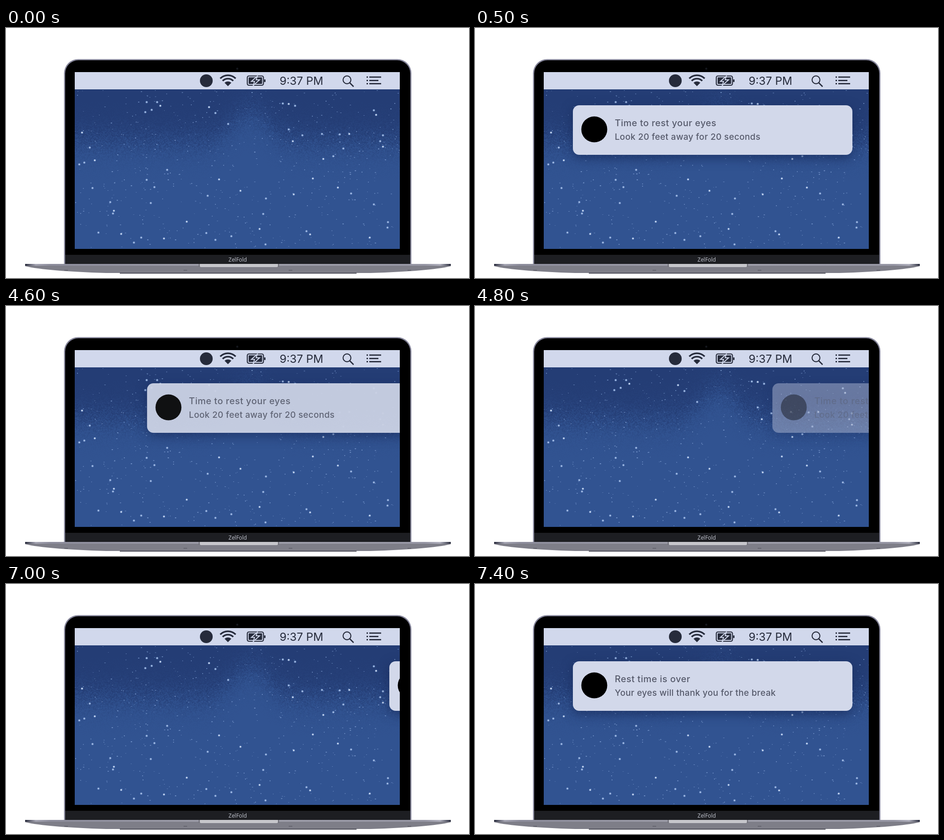
Animation, 1017 px wide and 550 px high, one loop 8 s. Source, as an HTML page with a canvas:

```html
<!DOCTYPE html>
<html lang="en">
<head>
<meta charset="utf-8">
<title>Eye rest reminder</title>
<style>
html, body { margin: 0; width: 100%; height: 100%; overflow: hidden; background: #fff; }
canvas { display: block; }
</style>
</head>
<body>
<canvas id="stage" width="1017" height="550"></canvas>
<script>
const canvas = document.getElementById('stage');
const ctx = canvas.getContext('2d');
const LOOP = 8000, STEP = 100;
const SCREEN = { x: 151, y: 97, w: 714, h: 389 };
const PANEL = { x: 215, y: 170, w: 614, h: 109 };
const TRAVEL = 650;
const PALE = '#d1d8ec', INK = '#262b3b';
const MESSAGES = [
  ['Time to rest your eyes', 'Look 20 feet away for 20 seconds'],
  ['Rest time is over', 'Your eyes will thank you for the break']
];
const STARS = [
  167,230, 161,300, 172,296, 195,291, 354,312, 318,385, 729,351, 309,163,
  332,163, 339,171, 320,180, 306,185, 446,174, 460,187, 488,211, 621,167,
  608,166, 621,223, 630,249, 635,171, 651,236, 697,288, 719,282, 808,181,
  813,191, 828,236, 822,249, 828,261, 694,233, 733,234, 754,233, 741,265,
  184,263, 237,402, 235,408, 229,383, 347,463, 440,451, 460,466, 557,442,
  660,447, 203,450, 253,453, 297,461, 281,472, 515,358, 808,388, 758,364,
  632,366, 326,350, 309,334, 468,333, 443,369, 565,409, 397,426, 839,427,
  838,439, 674,331, 190,352, 571,375, 668,454, 495,458, 570,476, 799,461
];

function seeded(seed) {
  return () => {
    seed = (Math.imul(seed, 1664525) + 1013904223) >>> 0;
    return seed / 4294967296;
  };
}

function layer(w, h) {
  const c = document.createElement('canvas');
  c.width = w;
  c.height = h;
  return c;
}

function poly(g, points, fill) {
  g.beginPath();
  points.forEach(([x, y]) => g.lineTo(x, y));
  g.closePath();
  g.fillStyle = fill;
  g.fill();
}

function box(g, x, y, w, h, r, fill) {
  g.beginPath();
  g.roundRect(x, y, w, h, r);
  g.fillStyle = fill;
  g.fill();
}

function disc(g, x, y, r, fill) {
  g.beginPath();
  g.arc(x, y, r, 0, Math.PI * 2);
  g.fillStyle = fill;
  g.fill();
}

function line(g, x1, y1, x2, y2, width, color) {
  g.beginPath();
  g.moveTo(x1, y1);
  g.lineTo(x2, y2);
  g.lineWidth = width;
  g.strokeStyle = color;
  g.stroke();
}

function label(g, str, x, y, font, color, spacing = 0) {
  g.font = font;
  g.letterSpacing = spacing + 'px';
  g.fillStyle = color;
  g.fillText(str, x, y);
  g.letterSpacing = '0px';
}

// Night sky: a ragged dark band above a lighter blue, with a glow in the middle
function drawSky(g) {
  const rand = seeded(41);
  const w = SCREEN.w / 2, h = Math.ceil(SCREEN.h / 2);
  const grain = layer(w, h), gg = grain.getContext('2d');
  const img = gg.createImageData(w, h);
  for (let j = 0; j < h; j++) {
    for (let i = 0; i < w; i++) {
      const x = SCREEN.x + i * 2, y = SCREEN.y + j * 2;
      const edge = 248 - 62 * Math.exp(-(((x - 535) / 55) ** 2));
      const dark = 1 / (1 + Math.exp((y - edge) / 19));
      const rough = 1.5 * dark * (1 - dark);
      const m = Math.min(1, Math.max(0, dark + (rand() - 0.5) * 2 * rough));
      const k = (j * w + i) * 4;
      img.data[k] = 49 - 13 * m;
      img.data[k + 1] = 83 - 22 * m;
      img.data[k + 2] = 145 - 28 * m;
      img.data[k + 3] = 255;
    }
  }
  gg.putImageData(img, 0, 0);
  g.imageSmoothingEnabled = false;
  g.drawImage(grain, SCREEN.x, SCREEN.y, w * 2, h * 2);

  for (let i = 0; i < 560; i++) {
    const x = SCREEN.x + rand() * SCREEN.w;
    const y = 136 + rand() * 349;
    g.globalAlpha = 0.25 + rand() * 0.5;
    g.fillStyle = '#7f9fd4';
    const long = rand() < 0.35 ? 3 : 2;
    g.fillRect(Math.round(x), Math.round(y), long, rand() < 0.5 ? 1 : 2);
  }
  g.globalAlpha = 1;
  for (let i = 0; i < STARS.length; i += 2) {
    const x = STARS[i], y = STARS[i + 1];
    disc(g, x, y, 2.6, 'rgba(120,155,212,.7)');
    disc(g, x, y, 1.5, i % 6 ? '#b4c8ea' : '#e6edf9');
  }
}

function drawMenu(g) {
  g.fillStyle = PALE;
  g.fillRect(SCREEN.x, SCREEN.y, SCREEN.w, 38);
  disc(g, 440, 116, 14, INK);

  g.strokeStyle = INK;
  g.lineWidth = 3.6;
  for (const r of [24, 16.5]) {
    g.beginPath();
    g.arc(487.5, 128, r, -Math.PI * 0.75, -Math.PI * 0.25);
    g.stroke();
  }
  g.beginPath();
  g.moveTo(487.5, 128);
  g.arc(487.5, 128, 10.5, -Math.PI * 0.75, -Math.PI * 0.25);
  g.fillStyle = INK;
  g.fill();

  g.lineWidth = 2.2;
  g.beginPath();
  g.roundRect(530, 105.5, 35.5, 20.5, 3.5);
  g.stroke();
  box(g, 533, 108.5, 29.5, 14.5, 1, INK);
  box(g, 567, 113, 3, 6, 1, INK);
  const bolt = [[552, 106], [539, 117.5], [546, 117.5], [543, 126.5], [557, 114], [549.5, 114]];
  poly(g, bolt, INK);
  g.strokeStyle = PALE;
  g.lineWidth = 2;
  g.stroke();

  label(g, '9:37 PM', 601, 125, '24.5px Inter, sans-serif', INK);

  g.beginPath();
  g.arc(749, 114, 8.6, 0, Math.PI * 2);
  g.strokeStyle = INK;
  g.lineWidth = 2.2;
  g.stroke();
  line(g, 755, 120.5, 763.5, 129, 2.6, INK);

  [[108, 824], [115.5, 818], [122.5, 824]].forEach(([y, end]) => {
    line(g, 792, y, 795, y, 3, INK);
    line(g, 798, y, end, y, 2.8, INK);
  });
}

function drawLaptop(g) {
  g.fillStyle = '#fff';
  g.fillRect(0, 0, 1017, 550);
  box(g, 127.5, 68.5, 763, 451, [31, 31, 0, 0], '#85859a');
  box(g, 130, 71, 758, 449, [29, 29, 0, 0], '#000');
  g.fillStyle = '#1d1e22';
  g.fillRect(130, 499, 758, 21);
  disc(g, 508, 89.5, 2.3, '#15171d');
  g.textAlign = 'center';
  label(g, 'ZelFold', 509, 514, '12px "Open Sans", sans-serif', '#c5c8d2');
  g.textAlign = 'left';

  g.beginPath();
  g.moveTo(42, 519.5);
  g.lineTo(977, 519.5);
  g.lineTo(977, 524);
  g.quadraticCurveTo(930, 535, 800, 539);
  g.lineTo(220, 539);
  g.quadraticCurveTo(90, 535, 42, 524);
  g.closePath();
  g.fillStyle = '#7e7e88';
  g.fill();
  const rim = g.createLinearGradient(42, 0, 977, 0);
  [[0, '#252839'], [0.025, '#a5a5b3'], [0.06, '#8c8c9b'], [0.5, '#a0a0ab'],
   [0.94, '#9696a4'], [0.975, '#b0b0bd'], [1, '#252839']].forEach(([p, c]) => rim.addColorStop(p, c));
  g.fillStyle = rim;
  g.fillRect(42, 519, 935, 4);
  line(g, 250, 539.5, 770, 539.5, 1.4, '#30313d');
  box(g, 425, 519, 173, 7, [0, 0, 4, 4], '#c6c6cb');
  line(g, 424.5, 519, 424.5, 525, 2, '#66666f');
  line(g, 598.5, 519, 598.5, 525, 2, '#66666f');
  for (const x of [132, 394, 625, 886]) line(g, x - 4, 533, x + 4, 533, 1.5, '#5d5d67');
}

function drawScene() {
  const c = layer(1017, 550), g = c.getContext('2d');
  drawLaptop(g);
  g.save();
  g.beginPath();
  g.rect(SCREEN.x, SCREEN.y, SCREEN.w, SCREEN.h);
  g.clip();
  drawSky(g);
  drawMenu(g);
  g.restore();
  return c;
}

function drawPanel([title, body], offset, alpha) {
  ctx.save();
  ctx.beginPath();
  ctx.rect(SCREEN.x, 135, SCREEN.w, SCREEN.y + SCREEN.h - 135);
  ctx.clip();
  ctx.translate(offset, 0);
  ctx.globalAlpha = alpha;
  ctx.shadowColor = 'rgba(20,36,82,.6)';
  ctx.shadowBlur = 24;
  ctx.shadowOffsetY = 7;
  box(ctx, PANEL.x, PANEL.y, PANEL.w, PANEL.h, 14, '#d2d8ea');
  ctx.shadowColor = 'transparent';
  disc(ctx, 262, 223, 28.5, '#000');
  label(ctx, title, 307, 216, '500 20px Inter, sans-serif', '#565a6b', 0.5);
  label(ctx, body, 307, 246, '500 19px Inter, sans-serif', '#565a6b', 0.35);
  ctx.restore();
}

const ease = t => t < 0.5 ? 2 * t * t : 1 - 2 * (1 - Math.min(t, 1)) ** 2;
const enter = ms => TRAVEL * (1 - ease(0.133 + ms / 460));

const scene = drawScene();

function render(time) {
  const t = Math.floor((time % LOOP) / STEP) * STEP;
  ctx.drawImage(scene, 0, 0);
  if (t >= 100 && t < 4500) {
    drawPanel(MESSAGES[0], enter(t - 100), 1);
  } else if (t >= 4500 && t < 5000) {
    const p = ease(0.107 + (t - 4500) / 613);
    drawPanel(MESSAGES[0], TRAVEL * p, 1 - p ** 1.3);
  } else if (t >= 7000) {
    drawPanel(MESSAGES[1], enter(t - 7000), 1);
  }
}

const start = performance.now();
function tick() {
  render(performance.now() - start);
  requestAnimationFrame(tick);
}
tick();
</script>
</body>
</html>
```
